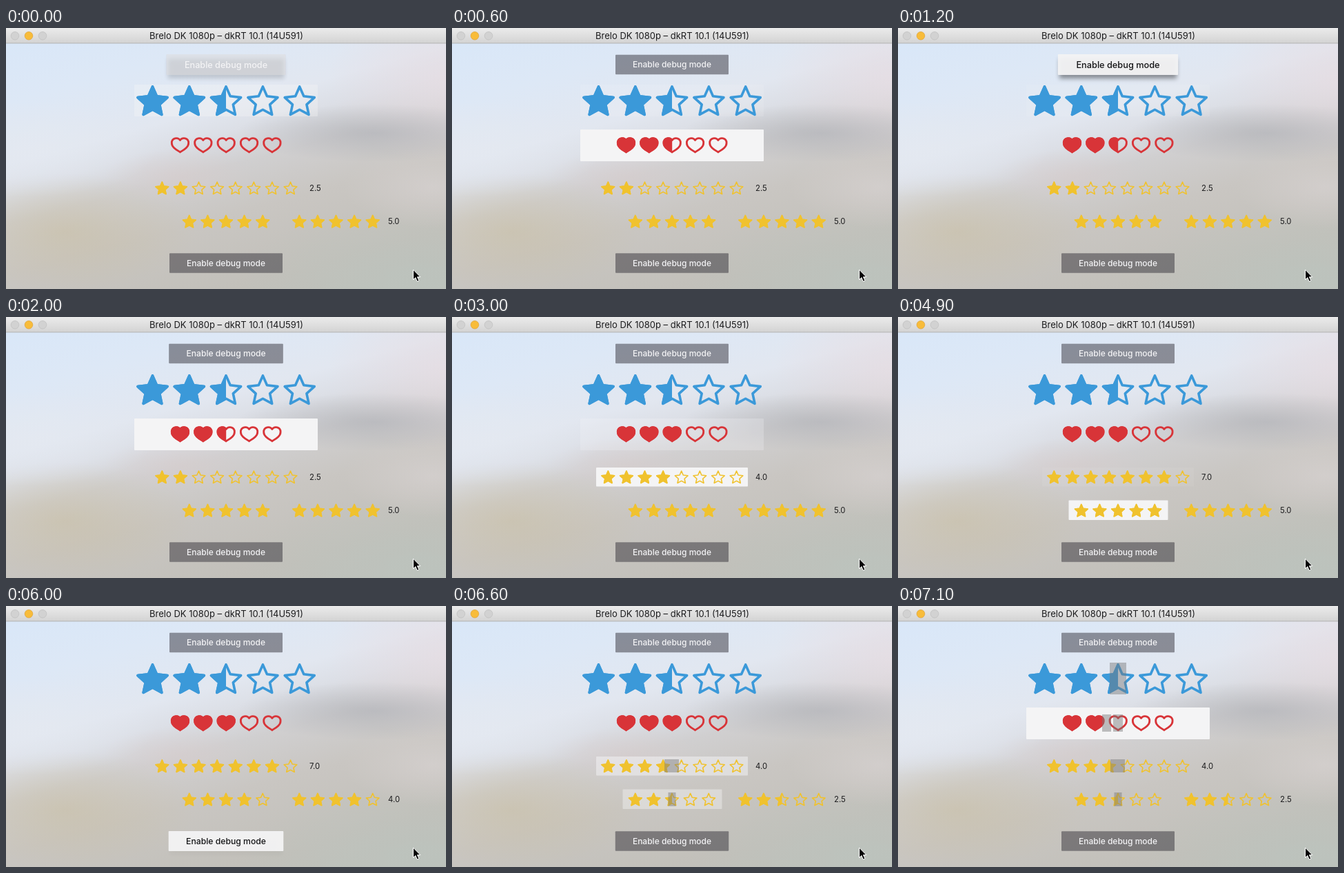
These frames come from a looping animation (638 by 378 pixels, 7200 ms). An HTML page:

```html
<!DOCTYPE html>
<html lang="en">
<head>
<meta charset="utf-8">
<title>Rating controls</title>
<style>
html, body { margin: 0; width: 100%; height: 100%; overflow: hidden; }
body {
  background:
    radial-gradient(200px 42px at 535px 152px, rgba(172,174,180,.6), rgba(172,174,180,0)),
    radial-gradient(170px 120px at 638px 75px, rgba(231,222,228,.8), rgba(231,222,228,0)),
    radial-gradient(130px 60px at 620px 230px, rgba(214,209,208,.75), rgba(214,209,208,0)),
    radial-gradient(190px 70px at 30px 175px, rgba(228,233,241,.8), rgba(228,233,241,0)),
    radial-gradient(110px 40px at 250px 215px, rgba(216,204,204,.5), rgba(216,204,204,0)),
    radial-gradient(190px 85px at 85px 295px, rgba(201,190,160,.55), rgba(201,190,160,0)),
    radial-gradient(260px 110px at 600px 365px, rgba(187,196,190,.7), rgba(187,196,190,0)),
    linear-gradient(165deg, #d9e7f8 4%, #dde8f6 20%, #e2e7f0 36%, #dcdfe6 43%, #d0cfd0 52%, #c9c6c2 65%, #c2c0ba 85%, #bdbfb9);
  background-size: 638px 378px;
  background-repeat: no-repeat;
}
svg { display: block; font-family: Inter, sans-serif; }
text { fill: #1c1c1e; }
</style>
</head>
<body>
<svg id="stage" width="638" height="378" viewBox="0 0 638 378"></svg>
<script>
const LOOP = 7200, STEP = 100, PRESS = 6000;
const STAR = 'M0-46 14-14.5 49.5-10 23.5 13.5 30.6 47 0 30.5-30.6 47-23.5 13.5-49.5-10-14-14.5Z';
const HEART = 'M0-7C-3-11.5-12.2-11-12.2-3C-12.2 3.5-5 7 0 10.3C5 7 12.2 3.5 12.2-3C12.2-11 3-11.5 0-7Z';

const BLUE = '#3b99d9', RED = '#d83438', GOLD = '#f0c22e';

// panel: focus background; values: [time, rating]; marks: touch boxes [time, x, y, w, h]
const rows = {
  blue: { shape: STAR, scale: .435, line: 3.6, color: BLUE, x: 212.5, y: 105, gap: 53.3, size: 47, count: 5,
    panel: [186, 82, 266, 46], values: [[0, 2.5]], marks: [[6800, 307, 82, 24, 46]] },
  hearts: { shape: HEART, scale: 1, line: 2.8, color: RED, x: 252.5, y: 169.5, gap: 33.35, size: 28, count: 5,
    panel: [186, 147, 266, 46], values: [[0, 0], [500, 2.5], [2400, 3], [6900, 2.5], [7000, 2]],
    marks: [[6900, 312, 157, 14, 25], [7000, 296, 157, 13, 25]] },
  eight: { shape: STAR, scale: .187, line: 1.6, color: GOLD, x: 226.3, y: 231.7, gap: 26.6, size: 20.5, count: 8,
    panel: [209, 218, 220, 27.5], whole: true, labelX: 440,
    values: [[0, 2.5], [3000, 4], [3300, 5], [3600, 6], [4200, 7], [6500, 4]], marks: [[6500, 308, 222, 21, 19]] },
  five: { shape: STAR, scale: .187, line: 1.6, color: GOLD, x: 265.8, y: 280, gap: 26.6, size: 20.5, count: 5,
    panel: [247.5, 265.5, 144, 28.5],
    values: [[0, 5], [5000, 2.5], [5100, 3], [5200, 3.5], [5300, 4], [6400, 2.5]], marks: [[6400, 313.5, 270, 11, 20]] },
};
rows.twin = { ...rows.five, x: 425.3, panel: null, labelX: 554, marks: [] };

const buttons = { top: 53, bottom: 340.5 };

const focusMoves = [
  [-1000, 'top'], [-100, 'blue'], [250, 'hearts'], [600, 'blue'], [840, 'top'],
  [1700, 'blue'], [1800, 'hearts'], [2700, 'eight'], [4520, 'five'], [5600, 'bottom'],
  [6250, 'five'], [6420, 'eight'], [6560, 'hearts'], [6680, 'blue'], [6820, 'hearts'],
];

const stage = document.getElementById('stage');
const part = id => document.getElementById(id);
const rect = ([x, y, w, h], attrs) => `<rect x="${x}" y="${y}" width="${w}" height="${h}" ${attrs}/>`;

function rowMarkup([name, r]) {
  const shapes = Array.from({ length: r.count }, (_, i) =>
    `<path d="${r.shape}" transform="translate(${r.x + i * r.gap} ${r.y}) scale(${r.scale})" vector-effect="non-scaling-stroke"/>`).join('');
  return `
    <clipPath id="${name}-clip">${rect([0, 0, 0, 378], `id="${name}-edge"`)}</clipPath>
    ${r.panel ? rect(r.panel, `id="${name}-panel" rx="1" fill="#f4f4f5"`) : ''}
    <g stroke="${r.color}" stroke-width="${r.line}" stroke-linejoin="round">
      <g fill="none">${shapes}</g>
      <g fill="${r.color}" clip-path="url(#${name}-clip)">${shapes}</g>
    </g>
    ${r.marks.map((m, i) => rect(m.slice(1), `id="${name}-mark${i}" fill="#777" fill-opacity=".45"`)).join('')}
    ${r.labelX ? `<text id="${name}-label" x="${r.labelX}" y="${r.y + 4}" font-size="11.3"/>` : ''}`;
}

const buttonMarkup = ([name, y]) => `
  <g id="${name}" transform="translate(319 ${y})">
    ${rect([-80, -8, 160, 27], `id="${name}-shadow" filter="url(#soft)"`)}
    ${rect([-82, -14.2, 164, 28.4], `id="${name}-dark" rx="1" fill="#24222a"`)}
    ${rect([-82, -14.2, 164, 28.4], `id="${name}-light" rx="1" fill="#f4f4f5"`)}
    <text id="${name}-text" y="4.3" text-anchor="middle" font-size="12" font-weight="500">Enable debug mode</text>
  </g>`;

stage.innerHTML = `
  <defs>
    <linearGradient id="bar" x2="0" y2="1"><stop stop-color="#ebebeb"/><stop offset="1" stop-color="#d3d3d3"/></linearGradient>
    <filter id="soft" x="-20%" y="-60%" width="140%" height="220%"><feGaussianBlur stdDeviation="3"/></filter>
  </defs>
  <rect width="638" height="22" fill="url(#bar)"/>
  <rect y="21.5" width="638" height="1" fill="#b3b3b3"/>
  <g stroke-width=".7">
    <circle cx="13" cy="11.3" r="5.8" fill="#d2d2d2" stroke="#bdbdbd"/>
    <circle cx="33" cy="11.3" r="5.8" fill="#f8bc3a" stroke="#dda032"/>
    <circle cx="53" cy="11.3" r="5.8" fill="#d2d2d2" stroke="#bdbdbd"/>
  </g>
  <text x="319.5" y="16" text-anchor="middle" font-size="13">Brelo DK 1080p – dkRT 10.1 (14U591)</text>
  ${Object.entries(buttons).map(buttonMarkup).join('')}
  ${Object.entries(rows).map(rowMarkup).join('')}
  <path d="M590.5 350V364.5L593.8 361.4 596.2 367 598.8 365.9 596.4 360.5H600.8Z" fill="#000" stroke="#fff" stroke-width="1"/>`;

// Linear chase towards 1 while focused and towards the floor otherwise.
function focusLevel(name, t, fadeIn, fadeOut, floor = 0) {
  let level = floor;
  focusMoves.forEach(([start, target], i) => {
    if (start > t) return;
    const end = Math.min(t, focusMoves[i + 1]?.[0] ?? LOOP);
    const span = end - start;
    level = target === name ? Math.min(1, level + span / fadeIn) : Math.max(floor, level - span / fadeOut);
  });
  return Math.max(0, level);
}

const latest = (list, t) => list.findLast(([start]) => start <= t)[1];
const smooth = p => p * p * (3 - 2 * p);

function drawRow(name, r, t) {
  const value = latest(r.values, t);
  const shown = r.whole ? Math.floor(value) : value;
  const full = Math.floor(shown);
  part(name + '-edge').setAttribute('width', r.x + full * r.gap - r.size / 2 + (shown - full) * r.size);
  if (r.panel) part(name + '-panel').style.opacity = focusLevel(name, t, 130, 400, -.45);
  if (r.labelX) part(name + '-label').textContent = value.toFixed(1);
  r.marks.forEach(([start], i) => part(name + '-mark' + i).style.opacity = t >= start ? 1 : 0);
}

function drawButton(name, y, t) {
  const glow = focusLevel(name, t, 120, 200);
  // A press sinks the focused button back towards the surface.
  const press = Math.max(0, 1 - Math.abs(t - PRESS) / 200);
  const lift = smooth(focusLevel(name, t, 400, 400)) * (1 - .75 * press);
  part(name).setAttribute('transform', `translate(319 ${y}) scale(${1 + .065 * lift})`);
  part(name + '-shadow').style.opacity = .42 * lift * lift * glow;
  part(name + '-dark').style.opacity = .46 * (1 - glow) ** 2;
  part(name + '-light').style.opacity = .95 * glow;
  part(name + '-text').style.fill = latest(focusMoves, t) === name ? '#151517' : '#f3f3f5';
}

function draw(now) {
  const t = Math.floor(now % LOOP / STEP) * STEP;
  for (const [name, r] of Object.entries(rows)) drawRow(name, r, t);
  for (const [name, y] of Object.entries(buttons)) drawButton(name, y, t);
}

let origin;
function tick(now) {
  origin ??= now;
  draw(now - origin);
  requestAnimationFrame(tick);
}
draw(0);
requestAnimationFrame(tick);
</script>
</body>
</html>
```
